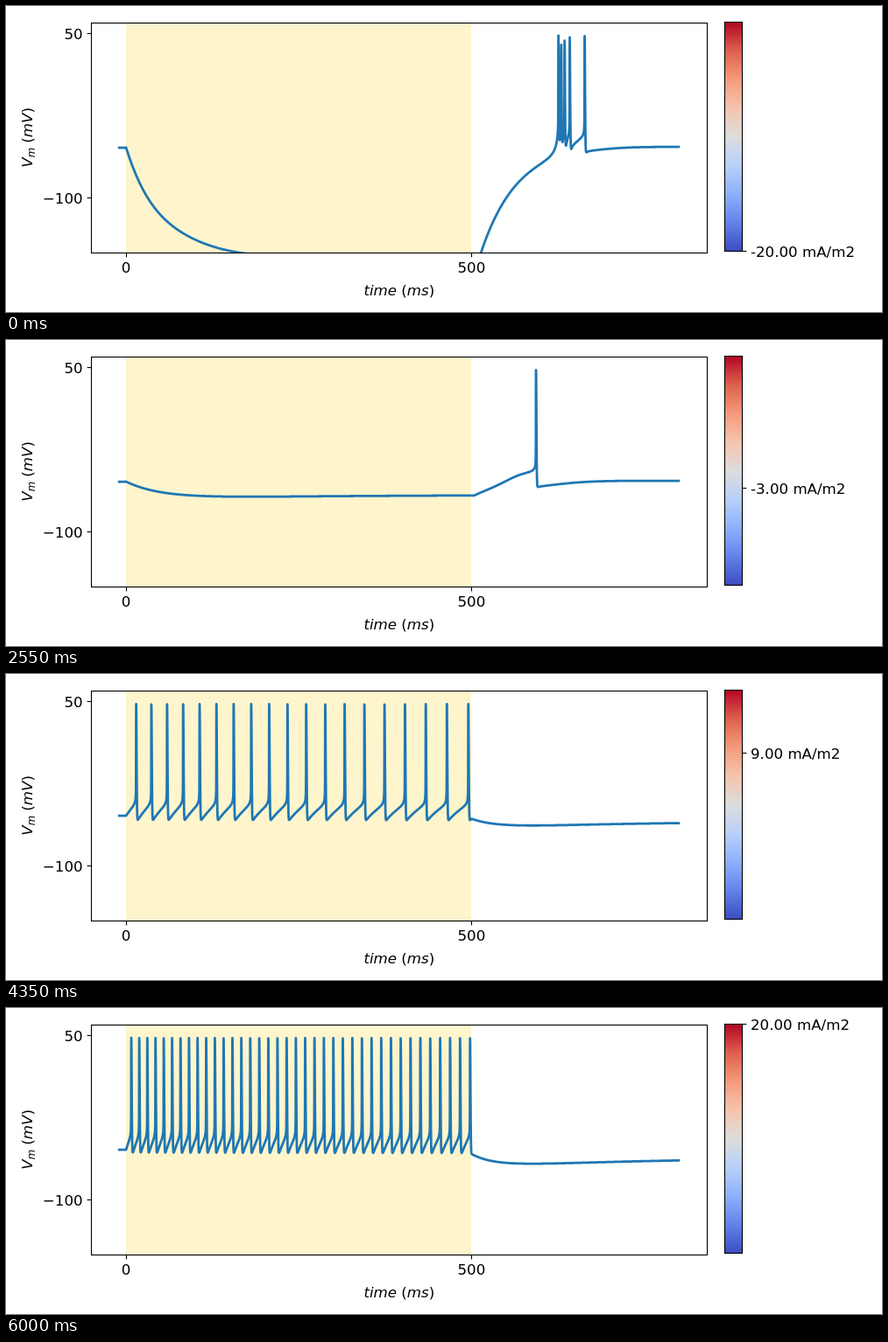
An HTML page with a canvas that plays this animation: 1000x350 px, repeating every 6150 ms.

```html
<!DOCTYPE html>
<html lang="en">
<head>
<meta charset="utf-8">
<title>Membrane response to current steps</title>
<style>
html, body { margin: 0; width: 100%; height: 100%; overflow: hidden; background: #fff; }
canvas { display: block; }
</style>
</head>
<body>
<canvas id="stage" width="1000" height="350"></canvas>
<script>
const ctx = document.getElementById('stage').getContext('2d');
const { exp, expm1 } = Math;
const STEP = 150, COUNT = 41, DT = 0.02;
const BOX = { x: 97.5, y: 19.5, w: 703, h: 263 };
const BAR = { x: 820.5, y: 18.5, w: 20, h: 262 };
const FONT = '16.67px "DejaVu Sans", sans-serif';
const px = t => 137.1 + 0.7885 * t;
const py = v => 19.3 + 1.252 * (60 - v);

// Conductance model of a low-threshold spiking cortical neuron (mV, ms, S/m2)
const trap = (x, y) => x / expm1(x / y) || y;
const sigm = (x, k) => 1 / (1 + exp(-x / k));
const rates = (a, b) => [a / (a + b), 1 / (a + b)];

// [steady state, time constant] of the gates m, h, n, p, s, u
function gates(v) {
  const d = v + 50, w = v - 7;
  return [
    rates(0.32 * trap(13 - d, 4), 0.28 * trap(d - 40, 5)),
    rates(0.128 * exp((17 - d) / 18), 4 * sigm(d - 40, 5)),
    rates(0.032 * trap(15 - d, 5), 0.5 * exp((10 - d) / 40)),
    [sigm(v + 35, 10), 4000 / (3.3 * exp((v + 35) / 20) + exp(-(v + 35) / 20))],
    [sigm(w + 57, 6.2), (0.612 + 1 / (exp(-(w + 132) / 16.7) + exp((w + 16.8) / 18.2))) / 3.7],
    [sigm(-(w + 81), 4), (w < -80 ? exp((w + 467) / 66.6) : exp(-(w + 22) / 10.5) + 28) / 3.7]
  ];
}

// Solver lag at the end of hyperpolarising pulses
const lag = amp => amp >= 0 ? 0 : amp < -13 ? 2 - 1.3 * (amp + 13) : 2 + 0.2 * (amp + 13);

function simulate(amp) {
  const path = new Path2D(), off = 500 + lag(amp);
  let v = -54;
  const g = gates(v).map(([inf]) => inf);
  for (let i = 0; i <= 810 / DT; i++) {
    const t = i * DT - 10;
    if (i % 4 === 0) path.lineTo(px(t), py(v));
    gates(v).forEach(([inf, tau], j) => { g[j] = inf + (g[j] - inf) * exp(-DT / tau); });
    const [m, h, n, p, s, u] = g;
    const na = 500 * m ** 3 * h, k = 40 * n ** 4 + 0.28 * p, ca = 4 * s * s * u, leak = 0.19;
    const sum = na + k + ca + leak;
    const drive = t >= 0 && t < off ? amp : 0;
    const goal = (50 * na - 90 * k + 120 * ca - 50 * leak + drive) / sum;
    v = goal + (v - goal) * exp(-DT * sum / 10);
  }
  return path;
}

const traces = [];
const trace = i => traces[i] ||= simulate(i - 20);

const ramp = ctx.createLinearGradient(0, BAR.y + BAR.h, 0, BAR.y);
['#3b4cc0', '#6282ea', '#8db0fe', '#b8d0f9', '#dddddd', '#f5c4ad', '#f49a7b', '#de604d', '#b40426']
  .forEach((c, i) => ramp.addColorStop(i / 8, c));

function line(x1, y1, x2, y2) {
  ctx.beginPath();
  ctx.moveTo(x1, y1);
  ctx.lineTo(x2, y2);
  ctx.stroke();
}

function text(s, x, y, align) {
  ctx.font = FONT;
  ctx.textAlign = align;
  ctx.fillText(s, x, y);
}

// Letters oblique, brackets upright; "_" makes the next letter a subscript
function formula(s, x, y) {
  ctx.textAlign = 'left';
  for (const part of s.match(/_\w|[a-z]+|[^a-z]/gi)) {
    const sub = part[0] === '_', str = sub ? part.slice(1) : part;
    ctx.font = (/[a-z]/i.test(str) ? 'italic ' : '') + (sub ? FONT.replace('16.67', '11.67') : FONT);
    ctx.fillText(str, x, y + (sub ? 2.7 : 0));
    x += ctx.measureText(str).width;
  }
}

function draw(i) {
  ctx.fillStyle = '#fff';
  ctx.fillRect(0, 0, 1000, 350);
  ctx.fillStyle = '#fef5cc';
  ctx.fillRect(137, BOX.y, 394, BOX.h);

  ctx.save();
  ctx.beginPath();
  ctx.rect(BOX.x, BOX.y, BOX.w, BOX.h);
  ctx.clip();
  ctx.strokeStyle = '#1f77b4';
  ctx.lineWidth = 2.78;
  ctx.lineJoin = 'round';
  ctx.lineCap = 'square';
  ctx.stroke(trace(i));
  ctx.restore();

  ctx.fillStyle = ramp;
  ctx.fillRect(BAR.x, BAR.y, BAR.w, BAR.h);
  ctx.strokeStyle = ctx.fillStyle = '#000';
  ctx.lineWidth = 1.11;
  for (const b of [BOX, BAR]) ctx.strokeRect(b.x, b.y, b.w, b.h);

  for (const t of [0, 500]) {
    const x = Math.floor(px(t)) + 0.5;
    line(x, 282.5, x, 287.4);
    text(t, px(t), 305, 'center');
  }
  for (const [v, s] of [[50, '50'], [-100, '\u2212100']]) {
    const y = Math.floor(py(v)) + 0.5;
    line(92.6, y, 97.5, y);
    text(s, 87.6, y + 6, 'right');
  }
  const y = Math.floor(BAR.y + BAR.h * (1 - i / 40)) + 0.5;
  line(840.5, y, 845.4, y);
  text((i - 20).toFixed(2) + ' mA/m2', 850, y + 6.5, 'left');

  formula('time (ms)', 408.4, 331);
  ctx.save();
  ctx.translate(30.3, 184.7);
  ctx.rotate(-Math.PI / 2);
  formula('V_m (mV)', 0, 0);
  ctx.restore();
}

let shown = -1;
function tick() {
  const i = Math.floor(performance.now() / STEP) % COUNT;
  if (i !== shown) draw(shown = i);
  requestAnimationFrame(tick);
}
tick();
</script>
</body>
</html>
```
